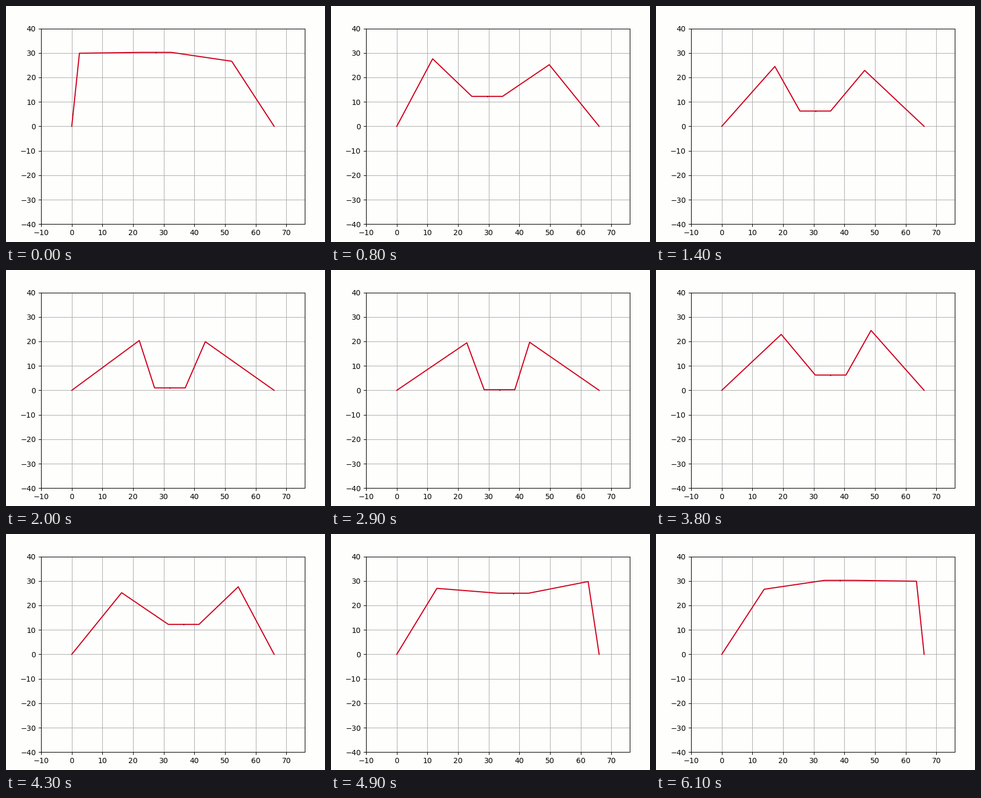
Animation of 600 by 446 pixels, one loop 6200 ms. Source, as a matplotlib script:

```python
import numpy as np
import matplotlib.pyplot as plt
from matplotlib.animation import FuncAnimation

W, H, DPI = 600, 446, 100
FRAMES, INTERVAL = 62, 100

BASE_GAP = 66          # distance between the two fixed joints
UPPER, FORE = 30, 20   # link lengths
HALF = 5               # half the platform length
START_X, STEP_X = 27.5, 0.5

# frames at which the platform jumps one step to the right
JUMPS = [1, 3, 5, 8, 10, 12, 15, 17, 19, 22, 24,
         27, 30, 32, 34, 36, 39, 41, 44, 46, 48, 51]

PAPER, RED, DOT = "#fefefd", "#d1001c", "#30104a"


def elbow(reach, height):
    """Raised elbow of a two-link arm at the origin."""
    d = np.hypot(reach, height)
    bend = np.arccos((UPPER**2 + d**2 - FORE**2) / (2 * UPPER * d))
    angle = np.arctan2(height, reach) + bend
    return UPPER * np.cos(angle), UPPER * np.sin(angle)


def linkage(cx, cy):
    left, right = cx - HALF, cx + HALF
    lx, ly = elbow(left, cy)
    rx, ry = elbow(BASE_GAP - right, cy)
    return ([0, lx, left, right, BASE_GAP - rx, BASE_GAP],
            [0, ly, cy, cy, ry, 0])


plt.rcParams["font.family"] = "DejaVu Sans"
fig = plt.figure(figsize=(W / DPI, H / DPI), dpi=DPI, facecolor=PAPER)
ax = fig.add_axes([66 / W, 33.8 / H, 496 / W, 369.6 / H], facecolor=PAPER)
ax.set_xlim(-10, 76)
ax.set_ylim(-40, 40)
ax.set_xticks(range(-10, 71, 10))
ax.set_yticks(range(-40, 41, 10))
ax.grid(True)

arms, = ax.plot([], [], color=RED, lw=1.5)
dot, = ax.plot([], [], "s", color=DOT, ms=1.3, mew=0)


def update(frame):
    cx = START_X + STEP_X * np.searchsorted(JUMPS, frame, side="right")
    cy = (cx - BASE_GAP / 2) ** 2
    arms.set_data(*linkage(cx, cy))
    dot.set_data([cx], [cy - 0.15])
    return arms, dot


anim = FuncAnimation(fig, update, frames=FRAMES, interval=INTERVAL,
                     repeat=True, repeat_delay=0)
plt.show()
```
